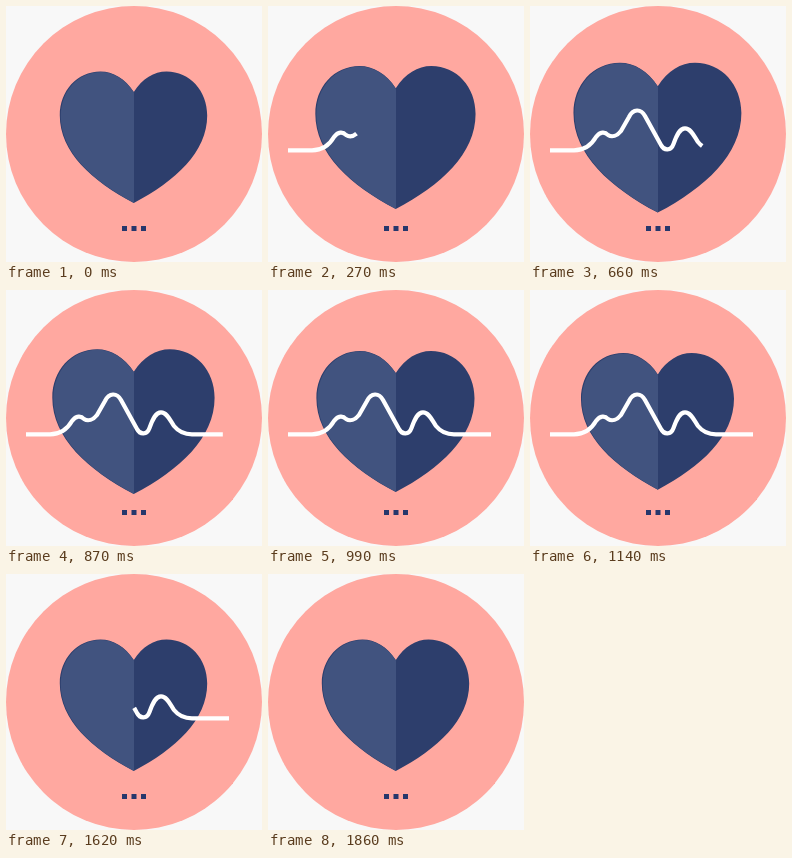
Write an HTML page that moves like this. It is 256x256 px and loops after 3.86 s.

```html
<!DOCTYPE html>
<html lang="en">
<head>
<meta charset="utf-8">
<title>Heartbeat</title>
<style>
  html, body { margin: 0; width: 100%; height: 100%; overflow: hidden; background: #f8f8f8; }
  svg { display: block; width: 100vw; height: 100vh; }
</style>
</head>
<body>
<svg viewBox="0 0 256 256">
  <circle cx="128" cy="128" r="128" fill="#ffa8a0"/>
  <g id="heart">
    <path fill="#2d3e6c" d="M127.8 86C119 72.500 107 65.500 94.500 65.500C71 65.500 53.800 85 53.800 109.500C53.800 146 86 175 127.800 197C169.500 175 201.200 146 201.200 109.500C201.200 85 184 65.500 160.500 65.500C148 65.500 136.500 72.500 127.800 86Z"/>
    <path fill="#41537f" d="M128 86.500C119 73 107 66 94.800 66C71.800 66 54.700 85.500 54.700 109.800C54.700 146 86.500 175 128 197Z"/>
  </g>
  <path id="pulse" pathLength="1000" fill="none" stroke="#fff" stroke-width="4.200" stroke-linejoin="round"
    d="M20 144.300H44C56 144.300 62 138 66 131C70 125.500 75 125.500 78 129C82 131.500 87 130 91 125L99 111C103 102.500 111 102.500 115 110L131 139C134 145 141 145 143.500 138C147 128 150 122.300 155 122.300C161 122.300 164 130 168 136C172 141 178 144.300 186 144.300H223"/>
  <path fill="#26376c" d="M116 220h5v5h-5zM125.500 220h5v5h-5zM135 220h5v5h-5z"/>
</svg>
<script>
const LOOP = 3860, STEP = 30, LAST = 1860;
const heart = document.getElementById('heart');
const pulse = document.getElementById('pulse');

const span = (t, from, to) => Math.min(1, Math.max(0, (t - from) / (to - from)));
const sine = p => (1 - Math.cos(Math.PI * p)) / 2;
const cubic = (a, b, s) => 3 * a * s * (1 - s) ** 2 + 3 * b * s * s * (1 - s) + s ** 3;

function bezier(x1, y1, x2, y2, x) {
  let lo = 0, hi = 1;
  for (let i = 0; i < 24; i++) {
    const mid = (lo + hi) / 2;
    if (cubic(x1, x2, mid) < x) lo = mid; else hi = mid;
  }
  return cubic(y1, y2, (lo + hi) / 2);
}

function draw(t) {
  const beat = sine(span(t, 0, 490)) - sine(span(t, 490, 1470));
  const scale = 1 + 0.15 * beat;
  heart.setAttribute('transform', `translate(128 128) scale(${scale}) translate(-128 -128)`);

  const head = 1000 * bezier(0.25, 0.12, 0.67, 1, span(t, 0, 965));
  const tail = 1000 * sine(span(t, 1350, 1860));
  const length = head - tail;
  pulse.setAttribute('visibility', length > 0.5 ? 'visible' : 'hidden');
  pulse.setAttribute('stroke-dasharray', `0 ${tail} ${length} 2000`);
}

const start = performance.now();
function tick() {
  const t = (performance.now() - start) % LOOP;
  draw(Math.min(LAST, Math.floor(t / STEP) * STEP));
  requestAnimationFrame(tick);
}
tick();
</script>
</body>
</html>
```
